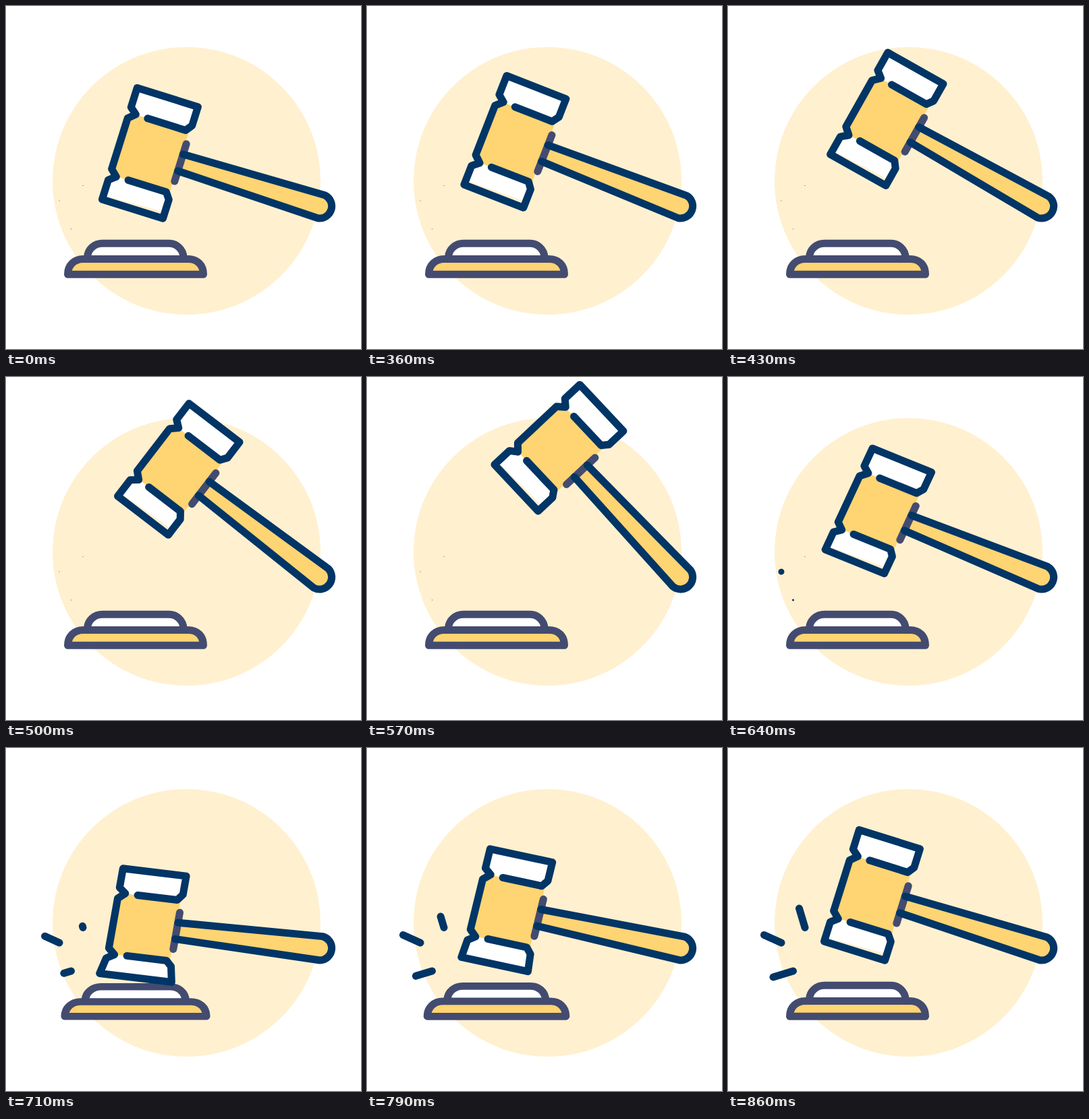
Recreate the animation shown at these times as an HTML page. Size 526 by 509 pixels, loop 1.43 s.

```html
<!DOCTYPE html>
<html lang="en">
<head>
<meta charset="utf-8">
<title>Gavel</title>
<style>
  html, body { margin: 0; width: 100%; height: 100%; overflow: hidden; background: #fff; }
  svg { display: block; width: 526px; height: 509px; }
  .line { fill: none; stroke: #003566; stroke-width: 11; stroke-linecap: round; stroke-linejoin: round; }
  .slate { stroke: #434b70; }
  .gold { fill: #ffd472; }
  .white { fill: #fff; }
</style>
</head>
<body>
<svg viewBox="0 0 526 509">
  <circle cx="267.5" cy="259.5" r="198.5" fill="#fff0cf"/>
  <g id="base">
    <path class="line slate white" d="M120.500 375.500V373C121 361 131 352.300 143 352.300H241C253 352.300 262.500 361 263 373V375.500"/>
    <path class="line slate gold" d="M91.500 398.300C91.500 384 102 375.500 114 375.500H270C283 375.500 292.500 384 292.500 398.300Z"/>
  </g>
  <g id="gavel">
    <path id="body" class="gold"/>
    <path id="crown" class="white"/>
    <path id="foot" class="white"/>
    <path id="grip" class="gold"/>
    <path id="collar" class="line slate"/>
    <path id="head" class="line"/>
    <path id="handle" class="line"/>
  </g>
  <g id="rays">
    <path class="line"/><path class="line"/><path class="line"/>
  </g>
</svg>
<script>
const $ = id => document.getElementById(id);
const LOOP = 1430, TILT = 17.4, CAP = 18, WIDTH = 11;

// Lower half of the head, relative to the handle's end; the upper half mirrors it
const half = [[-282, 48], [-223, 48], [-216, 57.5], [-216, 86.7], [-310.4, 86.7], [-310.4, 56.5], [-300.5, 48.5], [-310.4, 39.4]];
const flip = pts => pts.map(([x, y]) => [x, -y]);

// Motion in ticks: linear between [tick, value] keys
const swing = [[0, 0], [1, 3.9], [3, 20.1], [4, 29.4], [5, 4.7], [6, -10.5], [8, 0]];
const squash = [[4, 0], [5, .9], [6, 1], [8, 0]];
const impact = [[5, 0], [6, 1], [8, 0]];

const rays = [
  { from: [114, 266.5], to: [105.5, 238], start: 5.85, span: 2 },
  { from: [79, 289], to: [53.5, 277.5], start: 5.05, span: 1.13 },
  { from: [96.5, 331], to: [67, 340], start: 5.2, span: 2.2 }
];

const clamp = v => Math.min(1, Math.max(0, v));
const mix = (a, b, k) => a + (b - a) * k;
const path = pts => 'M' + pts.map(p => p.map(v => v.toFixed(2)).join(' ')).join('L');
const set = (id, d) => $(id).setAttribute('d', d);

function sample(keys, n) {
  const i = keys.findIndex(k => k[0] >= n);
  if (i < 1) return keys[i < 0 ? keys.length - 1 : 0][1];
  const [a, b] = [keys[i - 1], keys[i]];
  return mix(a[1], b[1], (n - a[0]) / (b[0] - a[0]));
}

// Flatten and shear the gavel, and flare its foot when it strikes
function deformer(press, flare) {
  return pts => pts.map(([x, y]) => {
    const k = flare * clamp((y - 50) / 36.7);
    const side = Math.sign(x + 263);
    return [x + press * (2.5 - .053 * y) + 6.5 * side * k, y * (1 - .05 * press) - 6 * k];
  });
}

// Where a line from p touches the round end of the handle
function tangent([x, y], side) {
  const a = Math.atan2(-y, -x) - side * Math.asin(CAP / Math.hypot(x, y));
  return [-side * CAP * Math.sin(a), side * CAP * Math.cos(a)];
}

function drawGavel(n) {
  const flare = sample(impact, n);
  const bend = deformer(sample(squash, n), flare);
  const shape = pts => path(bend(pts));
  const crown = flip(half);
  const foot = half.map(([x, y], i) => [x, i === 3 ? mix(77, y, flare) : i === 4 ? mix(80, y, flare) : y]);

  set('body', shape([[-310, -39], [-300, -48], [-218, -48], [-218, 48], [-300, 48], [-310, 39]]) + 'Z');
  set('crown', shape(crown.slice(0, 7)) + 'Z');
  set('foot', shape(foot.slice(0, 7)) + 'Z');
  set('head', shape([...crown, ...half.slice().reverse()]));
  set('collar', shape([[-216, -29], [-216, 29]]));

  const [top, bottom] = bend([[-216, -13], [-216, 13]]);
  const grip = path([top, tangent(top, -1)]) +
    `A${CAP} ${CAP} 0 0 1 ${tangent(bottom, 1)}L${bottom}`;
  set('grip', grip + 'Z');
  set('handle', grip);
  $('gavel').setAttribute('transform', `translate(464.6 297) rotate(${TILT + sample(swing, n)})`);
}

function drawBase(n) {
  const k = .043 * sample(impact, n);
  $('base').setAttribute('transform',
    `translate(192 398.3) scale(${1 + k} ${1 - k}) translate(-192 -398.3)`);
}

// A ray swells from a speck, then grows outwards
function drawRays(n) {
  rays.forEach(({ from, to, start, span }, i) => {
    const length = Math.max(.001, clamp((n - start) / span));
    const el = $('rays').children[i];
    el.setAttribute('d', path([from, from.map((v, j) => mix(v, to[j], length))]));
    el.style.strokeWidth = mix(1, WIDTH, clamp(1 - (start - n) * 4));
  });
}

// Ticks of 70 ms after a rest; the strike is held 10 ms longer
function tickAt(t) {
  if (t >= 780) t -= 10;
  return Math.min(8, Math.max(0, Math.floor((t - 290) / 70)));
}

const begin = performance.now();
let shown;
function frame() {
  const n = tickAt((performance.now() - begin) % LOOP);
  if (n !== shown) {
    shown = n;
    drawBase(n);
    drawGavel(n);
    drawRays(n);
  }
  requestAnimationFrame(frame);
}
frame();
</script>
</body>
</html>
```
